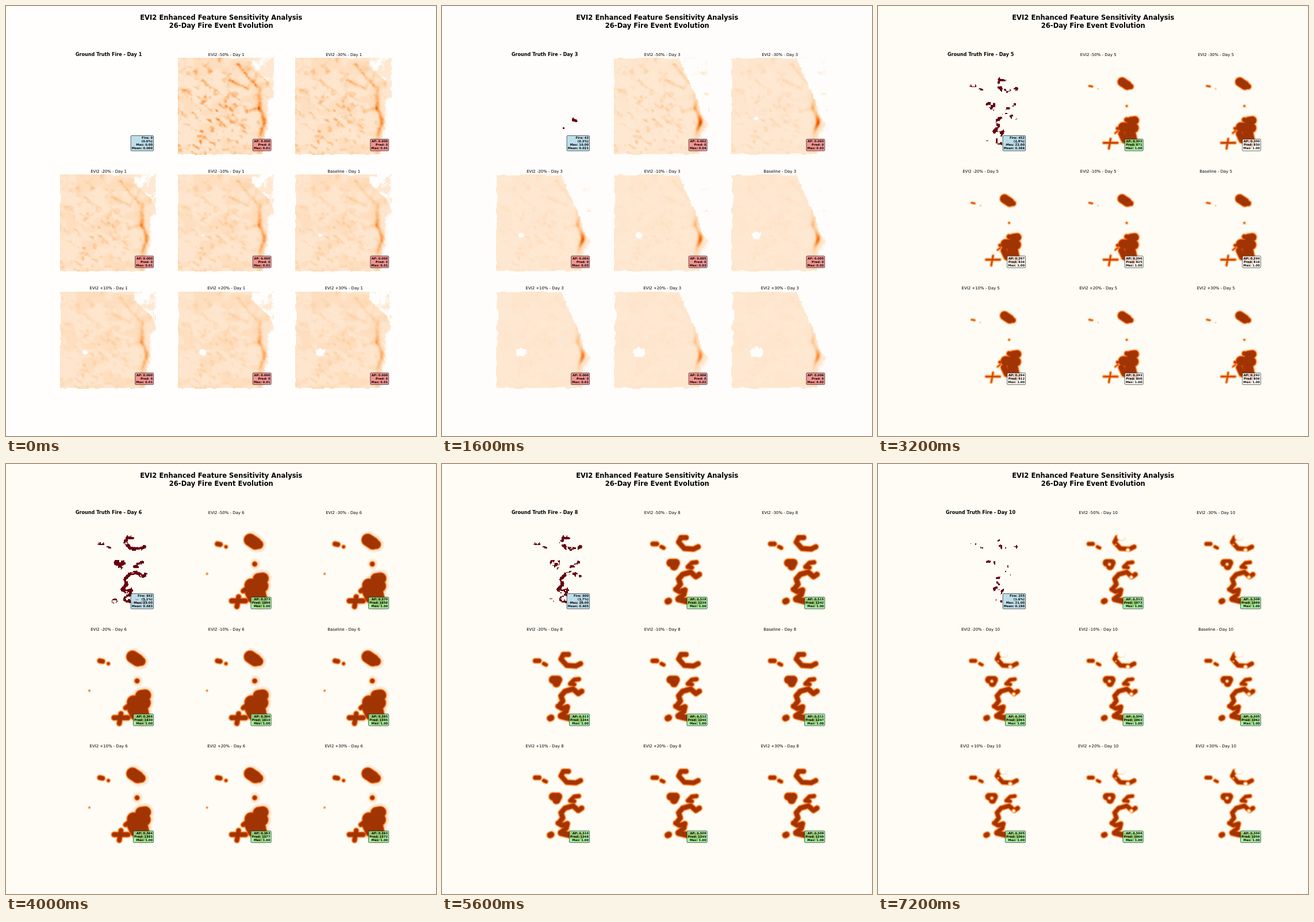
Animation of 748x748 px, one loop 8 s. Source, as an HTML page with a canvas:

```html
<!DOCTYPE html>
<html lang="en">
<head>
<meta charset="utf-8">
<title>Feature sensitivity</title>
<style>
html, body { margin: 0; width: 100%; height: 100%; overflow: hidden; background: #fffdfb; }
canvas, svg { position: absolute; left: 0; top: 0; width: 748px; height: 748px; }
text { font-family: "DejaVu Sans", Verdana, sans-serif; }
.b { font-weight: bold; }
</style>
</head>
<body>
<canvas id="map" width="748" height="748"></canvas>
<svg id="ui" viewBox="0 0 748 748"></svg>
<script>
const N = 128, W = 167.3, H = 169, STEP = 800, DAYS = 10;
const CHANGES = ['-50%', '-30%', '-20%', '-10%', '', '+10%', '+20%', '+30%'];
const BACK = ['#fffefd', '#fffdfc', '#fffdfb', '#fffcf6'];

// Fire shapes are thick polylines: [radius, x, y, x, y, ...]
const SEED = [[3.6, 134, 108, 139, 110], [2, 118, 123]];
const MASS = [
  [3.4, 69, 49, 74, 50], [2.1, 84, 54], [10, 126, 42, 135, 48], [7, 133, 50, 141, 50],
  [3.6, 134, 84], [.2, 51, 101], [9.5, 141, 110, 148, 109], [11, 128, 121, 146, 122],
  [8, 125, 132, 130, 143], [12, 140, 132, 143, 146], [3.4, 114, 131, 119, 127],
  [3.8, 94, 148, 118, 148], [3.6, 106, 141, 103, 158]
];
const FRONT = [
  [3.2, 68, 49, 75, 49], [2.4, 83, 54, 87, 56],
  [3.6, 126, 38, 117, 38, 113, 46, 123, 57, 139, 58, 147, 54],
  [6.2, 99, 82, 108, 82, 105, 88], [3, 144, 81, 136, 82, 129, 89, 136, 90],
  [3.8, 149, 102, 143, 106, 134, 98, 120, 102, 113, 110, 116, 119, 110, 127],
  [3.8, 108, 128, 115, 132, 124, 129, 122, 137, 113, 144],
  [4.8, 113, 145, 125, 148, 148, 151], [4.6, 94, 149, 96, 148]
];
// Places that burn out: [x, y, radius]
const BURNT = [[104, 84.5, 3.5], [125, 36, 9], [115, 50, 2], [136, 60, 4.5], [142, 107, 4]];
const STREAKS = [[0, 105, 12, 124, 35, 138, 50], [0, 69, 107, 84, 120], [0, 108, 116, 117, 122], [0, 121, 93, 140, 88], [0, 90, 39, 122, 54]];

// Figures on key days; ap and pred run from the first to the last panel
const FIGURES = {
  3: { fire: 43, max: 10, mean: .021, ap: [.002, .006], pred: [0, 0] },
  4: { fire: 62, max: 22, mean: .048, ap: [.233, .222], pred: [44, 39] },
  6: { fire: 842, max: 21, mean: .683, ap: [.373, .363], pred: [1698, 1572] },
  8: { fire: 600, max: 20, mean: .405, ap: [.518, .509], pred: [1239, 1249] },
  10: { fire: 255, max: 21, mean: .19, ap: [.512, .504], pred: [1073, 1059] }
};
const NONE = { fire: 0, max: 0, mean: 0, ap: [0, 0], pred: [0, 0] };

const clamp = (v, a = 0, b = 1) => Math.min(b, Math.max(a, v));
const smooth = t => (t = clamp(t), t * t * (3 - 2 * t));
const mix = (a, b, t) => a + (b - a) * t;
const bell = (v, mid, width) => Math.exp(-(((v - mid) / width) ** 2));
const hash = (x, y) => { const s = Math.sin(x * 127.1 + y * 311.7) * 43758.5453; return s - Math.floor(s); };
function noise(x, y) {
  const i = Math.floor(x), j = Math.floor(y), u = smooth(x - i);
  return mix(mix(hash(i, j), hash(i + 1, j), u), mix(hash(i, j + 1), hash(i + 1, j + 1), u), smooth(y - j));
}
function segment(x, y, ax, ay, bx = ax, by = ay) {
  const dx = bx - ax, dy = by - ay;
  const t = clamp(((x - ax) * dx + (y - ay) * dy) / (dx * dx + dy * dy || 1));
  return Math.hypot(x - ax - dx * t, y - ay - dy * t);
}
function dist(shapes, x, y) {
  let best = 99;
  for (const [r, ...p] of shapes)
    for (let i = 0; i === 0 || i + 3 < p.length; i += 2)
      best = Math.min(best, segment(x, y, p[i], p[i + 1], p[i + 2], p[i + 3]) - r);
  return best;
}
function grid(fn) {
  const out = new Float32Array(N * N);
  for (let n = 0; n < N * N; n++) {
    const i = n % N, j = Math.floor(n / N);
    out[n] = fn((i + .5) * W / N, (j + .5) * H / N, i, j, n);
  }
  return out;
}
const memo = new Map();
function once(key, fn) {
  if (!memo.has(key)) memo.set(key, fn());
  return memo.get(key);
}

// Distance to the predicted fire: spots, then one mass, then thinning fronts
function fireField(day) {
  const age = clamp((day - 8) / 2);
  return once('fire' + day, () => grid((x, y) => {
    if (day === 4) return dist(SEED, x, y);
    const mass = day < 8 ? dist(MASS, x, y) : 0;
    if (day === 5) return Math.min(dist(SEED, x, y), mass + 3);
    if (day === 6) return mass;
    const front = dist(FRONT, x, y) + .6 * age;
    if (day === 7) return Math.min(front + .5, (mass + front) / 2);
    return BURNT.reduce((d, [bx, by, r]) => Math.max(d, r * age - Math.hypot(x - bx, y - by)), front);
  }));
}
function fireMap(day, k) {
  const field = fireField(day), spread = 5 * clamp(1 - Math.abs(day - 6) / 2);
  return grid((x, y, i, j, n) => {
    const d = field[n] + k * .03, reach = 4 + spread * smooth((x - 100) / 40);
    const glow = .13 * smooth((reach - d - 2 * noise(x / 2, y / 2)) / 6);
    return Math.max(.89 * smooth((3.5 - d) / 4.5), glow);
  });
}
// Observed cells: ragged patches along the fronts
function truthMap(day, fire) {
  const gap = day < 5 ? 0 : .3 + .6 * (1 - fire / 842);
  const field = fireField(day < 5 ? 4 : Math.max(day, 8));
  return grid((x, y, i, j, n) => {
    const d = field[n] + (hash(i, j) - .5);
    return d < -.8 && (day < 8 || d > -4) && noise(x / 4, y / 4) > gap ? 1 : 0;
  });
}

function edgeAt(day, y) {
  if (day === 3) return 113 + .45 * Math.min(y, 80) + 13 * bell(y, 116, 16);
  return 133 - 4 * day + 36 * smooth((y - 8) / 48) - 9 * smooth((y - 64) / 12) - 8 * smooth((y - 115) / 40);
}
const ridgeAt = y => 143 + 8 * bell(y, 110, 16) - 2 * bell(y, 88, 8);

function relief() {
  return once('relief', () => ({
    streak: grid((x, y) => bell(dist(STREAKS, x, y), 0, 2.6)),
    spot: grid((x, y) => {
      const n = .65 * noise((x * .8 + y * .6) / 10, (y * .8 - x * .6) / 5.5) + .35 * noise(x / 4, y / 4);
      return Math.max(0, n - .55) * 4 * (.4 + .6 * bell(x, 50, 63) * bell(y, 110, 63));
    }),
    patch: grid((x, y) => smooth((noise(x / 17, y / 12) - .52) * 5)),
    rough: grid((x, y) => noise(x / 3, y / 3))
  }));
}
// Low early risk: pale land, spots, an eastern ridge, a lake that grows with k
function terrainMap(day, k) {
  const { streak, spot, patch, rough } = relief(), late = day === 3;
  const spotGain = (late ? .12 : .12 + .1 * day) * Math.exp(-k * .6) + (late ? .02 : .08);
  const ridgeGain = late ? .56 - .028 * k : .26 + .14 * day - (.005 + .015 * day) * k;
  const lake = late ? 3 + 1.25 * k : 1.6 * k - 4 + 1.2 * day;
  const cut = .02 + .19 * day + .045 * k;
  return grid((x, y, i, j, n) => {
    const r = rough[n];
    const left = (late ? 1 + .7 * k : .35 * k) * noise(y / 9, 7) ** 2;
    const foot = (late ? 3 : 1.8) * noise(x / 9, 3), head = (late ? 2 : 1) * noise(x / 12, 5);
    if (x < left || y < head || y > H - foot) return 0;
    if (lake > day + .9 && Math.hypot(x - 44, (y - 105.5) / .74) < lake * (.75 + .5 * r)) return 0;

    const over = x - edgeAt(day, y) + (r - .5) * 4;
    if (over > 0) {
      if (y > (late ? 108 : 70)) return over < 3 && (i + j) & 1 ? .07 : 0;
      const s = noise(x / 7, y / 9) * .7 + r * .3 - .5 * bell(x, 137, 11) * bell(y, 15, 11);
      const dotted = s < cut + .16 && (i & 1 || late && j & 1);
      return s < cut || dotted ? 0 : late ? .08 : .11;
    }
    const peak = bell(y, 113, 12), notch = bell(y, 86, 10);
    const along = late ? peak + .3 * notch + .12 : (.42 + .55 * peak + .45 * notch) * (.7 + .5 * r);
    const ridge = bell(x, ridgeAt(y), 4) * smooth((y - 42) / 14) * along;
    const marks = (spot[n] + streak[n] * (.4 + r) * .9) * spotGain * ((i ^ j) & 1 ? 1.18 : .85);
    return (late ? .108 : .128) + (late ? .015 : .04) * patch[n] + marks + ridge * ridgeGain;
  });
}

const RAMP = ['fff5eb', 'fee6ce', 'fdd0a2', 'fdae6b', 'fd8d3c', 'f16913', 'd94801', 'a63603', '7f2704']
  .map(c => [0, 2, 4].map(i => parseInt(c.slice(i, i + 2), 16)));
function ramp(v) {
  const p = clamp(v) * 8, i = Math.min(7, Math.floor(p));
  return RAMP[i].map((c, n) => mix(c, RAMP[i + 1][n], p - i));
}
function tile(values, colour) {
  const c = document.createElement('canvas');
  c.width = c.height = N;
  const g = c.getContext('2d'), img = g.createImageData(N, N);
  values.forEach((v, n) => { if (v > .02) img.data.set([...colour(v), 255], n * 4); });
  g.putImageData(img, 0, 0);
  return c;
}

const pos = n => [94 + 204.6 * (n % 3), 90 + 203.3 * Math.floor(n / 3)];
function figures(day) {
  if (day < 3) return NONE;
  if (FIGURES[day]) return FIGURES[day];
  const a = FIGURES[day - 1], b = FIGURES[day + 1], half = key => (a[key] + b[key]) / 2;
  const pair = key => a[key].map((v, i) => (v + b[key][i]) / 2);
  return { fire: half('fire'), max: Math.round(half('max')), mean: half('mean'), ap: pair('ap'), pred: pair('pred') };
}
function layer(day) {
  return once('layer' + day, () => {
    const c = document.createElement('canvas');
    c.width = c.height = 748;
    const g = c.getContext('2d');
    g.fillStyle = BACK[Math.min(day, 4) - 1];
    g.fillRect(0, 0, 748, 748);
    CHANGES.forEach((_, k) => g.drawImage(tile(day < 4 ? terrainMap(day, k) : fireMap(day, k), ramp), ...pos(k + 1), W, H));
    if (day > 2) {
      g.imageSmoothingEnabled = false;
      g.drawImage(tile(truthMap(day, figures(day).fire), () => [103, 0, 13]), ...pos(0), W, H);
    }
    return c;
  });
}

const ui = document.getElementById('ui'), view = document.getElementById('map').getContext('2d');
function add(tag, attrs, str = '') {
  const el = document.createElementNS('http://www.w3.org/2000/svg', tag);
  for (const a in attrs) el.setAttribute(a, attrs[a]);
  el.textContent = str;
  return ui.appendChild(el);
}
const label = (x, y, size, anchor, bold, str) =>
  add('text', { x, y, 'font-size': size, 'text-anchor': anchor, class: bold ? 'b' : '' }, str);

label(374.3, 24.2, 11.55, 'middle', true, 'EVI2 Enhanced Feature Sensitivity Analysis');
label(374.3, 37.6, 11.55, 'middle', true, '26-Day Fire Event Evolution');
const panels = Array.from({ length: 9 }, (_, n) => {
  const [x, y] = pos(n), rows = n ? 3 : 4, h = 6.05 * rows + 2.3;
  const title = label(x + 84.6, y - 3.4, n ? 6.93 : 8.08, 'middle', !n);
  const box = add('rect', { y: y + 162 - h, height: h, rx: 1.5, stroke: '#000', 'stroke-width': .6, 'fill-opacity': .8 });
  const lines = Array.from({ length: rows }, (_, i) => label(x + 161, y + 159.4 - 6.05 * (rows - 1 - i), 5.2, 'end', true));
  return { x, title, box, lines };
});

function setPanel(p, title, rows, fill) {
  p.title.textContent = title;
  rows.forEach((s, i) => { p.lines[i].textContent = s; });
  view.font = 'bold 52px "DejaVu Sans", Verdana, sans-serif';
  const w = Math.max(...rows.map(s => view.measureText(s).width / 10)) + 3.2;
  p.box.setAttribute('x', p.x + 162.6 - w);
  p.box.setAttribute('width', w);
  p.box.setAttribute('fill', fill);
}
function topRisk(day, k) {
  if (day > 3) return day === 4 && k > 5 ? .99 : 1;
  return day === 3 ? .02 + .01 * (k < 4) + .01 * (k < 1) : day === 2 && k < 5 ? .02 : .01;
}
function show(day) {
  view.drawImage(layer(day), 0, 0);
  const f = figures(day);
  setPanel(panels[0], `Ground Truth Fire - Day ${day}`, [
    `Fire: ${f.fire.toFixed(0)}`, `(${(f.fire / N / N * 100).toFixed(1)}%)`,
    `Max: ${f.max.toFixed(2)}`, `Mean: ${f.mean.toFixed(3)}`
  ], 'lightblue');
  CHANGES.forEach((change, k) => {
    const t = (1 - Math.exp(-k / 3)) / (1 - Math.exp(-7 / 3));
    const ap = mix(...f.ap, t), pred = mix(...f.pred, t);
    const fill = ap > .3 ? 'lightgreen' : ap < .1 ? 'lightcoral' : '#fffffc';
    setPanel(panels[k + 1], `${change ? 'EVI2 ' + change : 'Baseline'} - Day ${day}`,
      [`AP: ${ap.toFixed(3)}`, `Pred: ${pred.toFixed(0)}`, `Max: ${topRisk(day, k).toFixed(2)}`], fill);
  });
}

let shown = 0;
function frame() {
  const day = Math.floor(performance.now() / STEP) % DAYS + 1;
  if (day !== shown) show(shown = day);
  requestAnimationFrame(frame);
}
frame();
</script>
</body>
</html>
```
